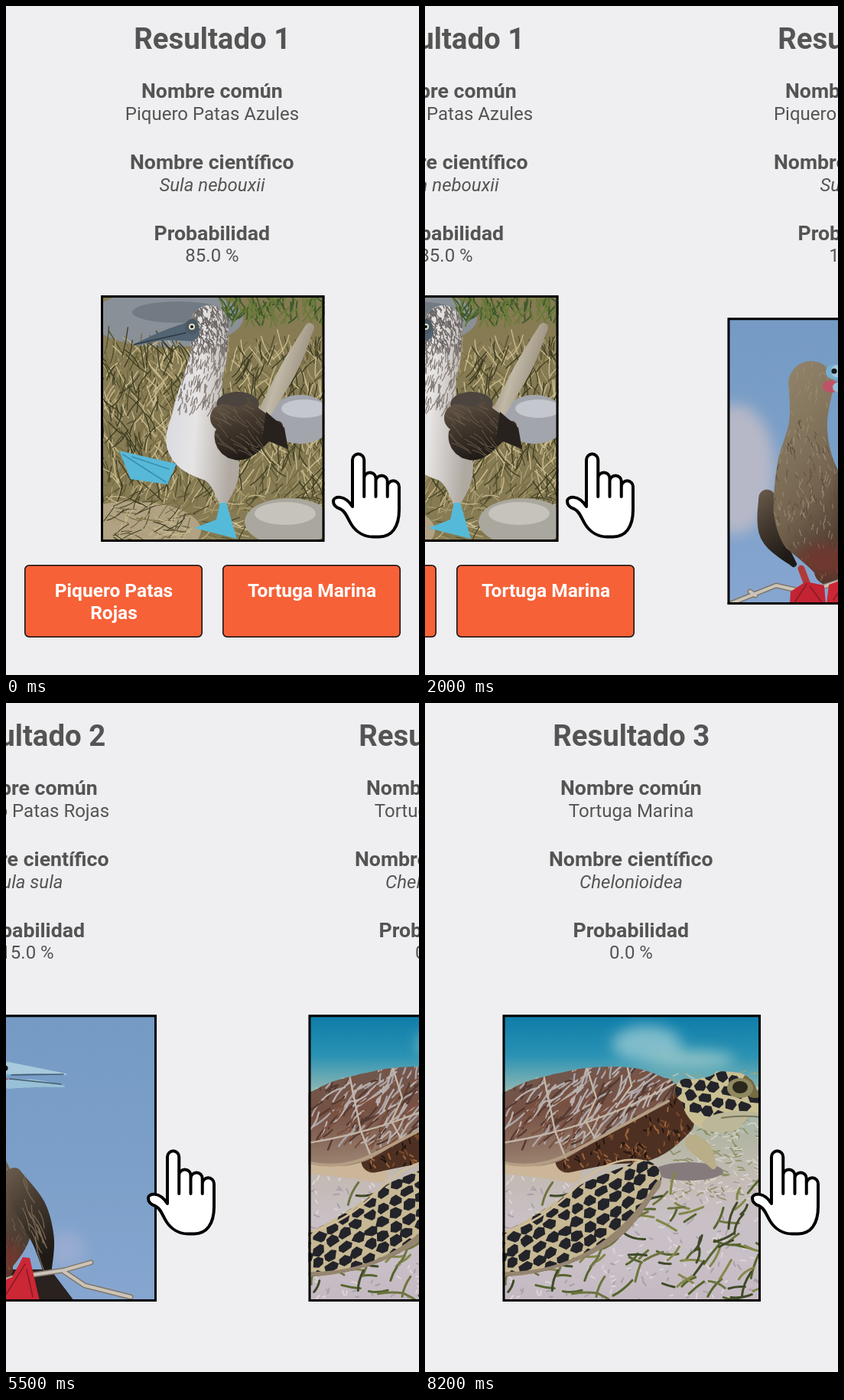
An HTML page for the animation above (9 s loop, 540x874 px).

```html
<!DOCTYPE html>
<html lang="es">
<head>
<meta charset="utf-8">
<title>Resultados</title>
<style>
html, body { margin: 0; width: 100%; height: 100%; overflow: hidden; background: #efeff1; }
#stage { display: block; width: 540px; height: 874px; }
text { font-family: Roboto, Arial, sans-serif; font-size: 24px; fill: #545454; text-anchor: middle; }
.title { font-size: 38.4px; font-weight: 700; }
.head { font-size: 26.7px; font-weight: 700; }
.sci { font-style: italic; }
.btn { font-size: 24.5px; font-weight: 700; fill: #fff; }
</style>
</head>
<body>
<svg id="stage" viewBox="0 0 540 874">
  <defs id="defs">
    <filter id="soft" x="-30%" y="-30%" width="160%" height="160%"><feGaussianBlur stdDeviation="9"/></filter>
  </defs>
  <g id="strip"></g>
</svg>
<script>
const PITCH = 536;
const LOOP = 9000;
const STEPS = [[0, 0], [2000, 242], [3500, 536], [5500, 778], [7000, 1072], [LOOP, 1072]];
const UP = -Math.PI / 2;

let seed = 11, ids = 0;
const rnd = () => {
  seed = (seed * 1664525 + 1013904223) % 4294967296;
  return seed / 4294967296;
};
const between = (a, b) => a + rnd() * (b - a);
const fix = v => v.toFixed(1);

const defs = document.getElementById('defs');
const define = markup => defs.insertAdjacentHTML('beforeend', markup);

// Evenly spaced gradient, returned as a paint
function fade(dx, dy, ...colors) {
  const id = `g${ids++}`;
  const stops = colors.map((c, i) => `<stop offset="${i / (colors.length - 1)}" stop-color="${c}"/>`).join('');
  define(`<linearGradient id="${id}" x2="${dx}" y2="${dy}">${stops}</linearGradient>`);
  return `url(#${id})`;
}

// Outline of a limb whose spine runs through "x,y,radius" points
function limb(points) {
  const p = points.split(' ').map(s => s.split(',').map(Number));
  const at = u => {
    const i = Math.min(Math.floor(u), p.length - 2), t = u - i;
    const b = p[i], c = p[i + 1], a = p[i - 1] || b, e = p[i + 2] || c;
    return b.map((v, k) => v + 0.5 * t * (c[k] - a[k] +
      t * (2 * a[k] - 5 * v + 4 * c[k] - e[k] + t * (3 * (v - c[k]) + e[k] - a[k]))));
  };
  const end = p.length - 1, left = [], right = [];
  for (let k = 0, n = end * 8; k <= n; k++) {
    const u = k / n * end, [x, y, r] = at(u);
    const [x0, y0] = at(Math.max(u - 0.02, 0)), [x1, y1] = at(Math.min(u + 0.02, end));
    const len = Math.hypot(x1 - x0, y1 - y0), nx = (y1 - y0) / len * r, ny = (x0 - x1) / len * r;
    left.push(`${fix(x + nx)},${fix(y + ny)}`);
    right.unshift(`${fix(x - nx)},${fix(y - ny)}`);
  }
  const cap = (r, to) => `A${r} ${r} 0 0 1 ${to}`;
  return `M${left.join('L')}${cap(p[end][2], right[0])}L${right.join('L')}${cap(p[0][2], left[0])}Z`;
}

const fill = (d, color, more = '') => `<path d="${d}" fill="${color}" ${more}/>`;
const line = (d, color, width, more = '') =>
  `<path d="${d}" fill="none" stroke="${color}" stroke-width="${width}" stroke-linecap="round" stroke-linejoin="round" ${more}/>`;
const poly = (points, color) => `<polygon points="${points}" fill="${color}"/>`;
const oval = (x, y, rx, ry, color, more = '') => `<ellipse cx="${x}" cy="${y}" rx="${rx}" ry="${ry}" fill="${color}" ${more}/>`;
const soft = art => `<g filter="url(#soft)">${art}</g>`;

// A filled shape with texture kept inside it
function skin(d, color, texture) {
  const id = `c${ids++}`;
  define(`<clipPath id="${id}"><path d="${d}"/></clipPath>`);
  return fill(d, color) + `<g clip-path="url(#${id})">${texture}</g>`;
}

// Random strokes inside a box
function blades(n, [x, y, w, h], len, angle, spread, color, width) {
  let d = '';
  for (let i = 0; i < n; i++) {
    const a = angle + between(-spread, spread), bend = a + between(-0.4, 0.4), l = len * between(0.25, 0.6);
    d += `M${fix(between(x, x + w))} ${fix(between(y, y + h))}` +
      `q${fix(Math.cos(bend) * l)} ${fix(Math.sin(bend) * l)} ${fix(Math.cos(a) * l * 2)} ${fix(Math.sin(a) * l * 2)}`;
  }
  return line(d, color, width);
}
const tufts = (n, box, len, angle, spread, width, colors) =>
  colors.map(c => blades(n, box, len, angle, spread, c, width)).join('');

// Staggered dark plates on a turned grid
function plates(x, y, cols, rows, w, h, deg) {
  let d = '';
  for (let r = 0; r < rows; r++) for (let c = 0; c < cols; c++) {
    const cx = (c + r % 2 / 2) * w + between(-2, 2), cy = r * h + between(-2, 2);
    for (let k = 0; k < 6; k++) {
      const a = (k + between(-0.3, 0.3)) * Math.PI / 3, s = between(0.42, 0.54);
      d += `${k ? 'L' : 'M'}${fix(cx + Math.cos(a) * w * s)} ${fix(cy + Math.sin(a) * h * s)}`;
    }
    d += 'Z';
  }
  return fill(d, '#23232a', `transform="translate(${x} ${y}) rotate(${deg})"`);
}

function blueFooted([x, y, w, h]) {
  const straw = ['#514e2c', '#ab9c70', '#776c44', '#c9bb8d', '#3f3e24'];
  const body = limb('266,416,25 265,455,24 257,490,26 252,530,34 258,568,48 282,612,24 284,650,5');
  const wing = limb('285,538,18 308,552,42 355,549,7');
  return `<rect x="${x}" y="${y}" width="${w}" height="${h}" fill="#867b53"/>` +
    oval(210, 408, 100, 38, '#8a9098') + oval(225, 400, 60, 14, '#727a84') +
    tufts(50, [285, 385, 130, 35], 24, UP, 0.9, 2, ['#3f5a2a', '#6a7a3a']) +
    tufts(190, [x, 450, w, 200], 32, UP, 0.9, 1.4, straw) +
    oval(385, 540, 42, 32, '#a2a5ac') + oval(390, 526, 30, 12, '#c4c7cd') +
    oval(165, 685, 90, 38, '#b0a283') +
    tufts(50, [x, 640, w, 60], 26, -0.4, 1, 1.1, straw) +
    oval(370, 674, 58, 31, '#aaa79e') + oval(365, 663, 40, 15, '#c5c3bb') +
    fill(limb('340,528,9 372,470,11 397,420,6'), fade(1, 0.5, '#75695a', '#c1b9a7', '#8d8272')) +
    skin(body, fade(1, 0.2, '#d5d8e0', '#e6e4e4', '#b0a9a2'),
      blades(260, [236, 390, 56, 60], 8, 1.3, 0.6, '#6b6664', 1.3) +
      blades(180, [226, 440, 65, 85], 11, 1.8, 0.3, '#857b75', 1.2)) +
    oval(303, 520, 28, 16, '#4c443e') +
    skin(wing, fade(0.4, 1, '#6b5d4d', '#43382e', '#1f1a16'),
      blades(50, [265, 515, 80, 70], 24, 0.7, 0.3, '#6a5c4c', 1)) +
    poly('340,530 364,551 369,579 335,565', '#28221e') +
    fill(limb('241,425,13 205,431,6 167,443,1'), '#526372') + line('M168 442L235 427', '#2d3943', 1.5) +
    oval(243, 419, 9, 10, '#4b5964') + oval(243, 419, 4, 4, '#e5e3c7') + oval(243, 419, 2, 2, '#111') +
    poly('148,581 223,598 211,625 163,618', '#58b8d8') + line('M153 586L209 622M165 589L213 605', '#398fae', 1.5) +
    poly('280,649 288,649 302,696 246,682 275,671', '#55bad9');
}

function redFooted([x, y, w, h]) {
  const body = limb('211,493,30 207,545,25 204,600,38 214,655,53 228,700,48 233,738,18');
  const dark = fade(0.4, 1, '#6b5d4d', '#43382e', '#1f1a16');
  const branch = 'M100 783L165 757L205 766L250 751L318 741L353 731M138 770L131 765M318 743L345 761L405 776';
  return `<rect x="${x}" y="${y}" width="${w}" height="${h}" fill="${fade(0, 1, '#759bc4', '#7b9fc8', '#86a6d0')}"/>` +
    soft(oval(112, 605, 52, 85, '#b6b8c7') + oval(320, 715, 25, 25, '#98abd0')) +
    poly('235,740 300,740 331,781 285,781', '#29221f') +
    fill(limb('153,642,11 159,690,15 188,729,4'), dark) +
    skin(body, fade(0.4, 1, '#94866f', '#86775f', '#74644f', '#4a372c'),
      blades(220, [160, 465, 110, 280], 8, 1.5, 0.6, '#9c8d76', 1) +
      blades(160, [160, 540, 115, 200], 8, 1.5, 0.6, '#5c4e3f', 1) +
      soft(oval(232, 725, 38, 22, '#70382f') + oval(262, 650, 14, 70, '#4d4034'))) +
    skin(limb('253,617,10 274,660,20 290,700,15 296,740,6'), dark,
      blades(24, [250, 610, 40, 110], 40, 1.15, 0.15, '#7a6a56', 1.2)) +
    oval(242, 478, 12, 10, '#77afcf') + oval(237, 497, 11, 8, '#bf5267') +
    fill(limb('245,477,8 280,480,4 320,485,1'), '#a8cadc') + fill(limb('245,498,6 280,497,5 318,501,1'), '#98c0d6') +
    line('M249 486L317 485M247 491L314 498', '#435b6c', 1.3) + oval(241, 477, 3.6, 3.6, '#15191c') +
    line(branch, '#81766b', 7) + line(branch, '#cbc4b8', 4) +
    line('M198 735L206 756', '#b03a38', 9) +
    poly('204,752 228,757 230,781 183,781 184,765', '#c32332') +
    poly('264,724 273,725 286,781 231,781 234,756 250,750', '#cc2735') +
    line('M205 755L190 778M209 758L224 778M267 733L240 776M269 740L277 776', '#841c27', 1.5);
}

function turtle([x, y, w, h]) {
  const weed = ['#56652f', '#83874a', '#6d7440', '#404a28'];
  const shell = limb('90,560,42 150,548,56 215,522,46 275,508,32 315,504,14');
  const neck = limb('185,598,16 235,580,24 290,565,32 330,530,33 352,520,20');
  const head = limb('342,506,16 372,520,38 412,520,36 430,523,18');
  const fin = limb('284,622,25 235,660,42 180,693,40 130,714,33 95,722,27');
  const sea = fade(0, 1, '#0d7ca9', '#2a92b3', '#9fbdb4', '#b3b6a4', '#c3bab4', '#c9c0c6', '#c9bfc7', '#c4b9c2');
  return `<rect x="${x}" y="${y}" width="${w}" height="${h}" fill="${sea}"/>` +
    soft(oval(290, 446, 45, 24, '#7fbccb') + oval(345, 466, 60, 12, '#8cc1c5')) +
    tufts(90, [x, 480, w, 90], 10, 0.1, 0.7, 1.4, ['#8fa58a', '#bcc4b2']) +
    tufts(90, [320, 550, 118, 100], 9, 0.2, 0.9, 1.6, ['#8a9063', '#d6d0c8']) +
    tufts(120, [x, 610, w, 170], 6, 0, 1.5, 2, ['#aaa0a8', '#dcd4d6']) +
    oval(345, 612, 45, 12, '#857b7c') +
    tufts(26, [x, 640, w, 140], 30, -0.4, 1, 3, weed) +
    fill(limb('90,600,14 150,606,14 195,616,11'), '#cbb699') +
    fill(limb('350,574,11 364,585,12 377,605,4'), '#b9ae88') +
    skin(neck, '#4e3022', tufts(110, [170, 495, 180, 125], 6, 1.2, 0.9, 2, ['#a0673c', '#24160f', '#7a4a2b'])) +
    skin(shell, fade(0.2, 1, '#6e5a52', '#765143', '#9a8270'),
      tufts(60, [x, 480, 220, 105], 30, -0.9, 0.45, 2.4, ['#a9a4a8', '#553a31', '#b8aeac', '#7b5140']) +
      line('M100 575Q220 556 326 497M155 486L170 559L186 600M211 475L224 516L210 546L224 572M265 477L270 500L250 528', '#c4b7a9', 2.4)) +
    line('M100 600Q145 611 186 590T318 520', '#b49e84', 4) +
    skin(head, '#c9bf93', plates(336, 478, 6, 4, 18, 16, 12) + oval(412, 552, 50, 19, '#bcb798') + oval(432, 498, 18, 18, '#756b43')) +
    line('M388 542Q414 538 438 541', '#77745b', 2) +
    oval(412, 503, 17, 13, '#8f8860') + oval(412, 502, 10, 8, '#2a281b') +
    skin(fin, '#c6b893', plates(82, 700, 15, 9, 20, 15, -33) +
      line('M95 750Q230 755 308 630', '#96866f', 14)) +
    line('M100 692Q150 680 195 635T284 598', '#d0bc99', 2.5);
}

// Four finger tops in a row, then palm and thumb
function hand() {
  const w = 15.25, tops = [593, 617, 621, 628], first = 453;
  let d = `M${first} 654V${tops[0]}`, folds = '';
  tops.forEach((top, i) => {
    const x = first + (i + 1) * w;
    d += `V${top}A${w / 2} ${w / 2} 0 0 1 ${x} ${top}`;
    if (i < 3) folds += `M${x} ${top}V641`;
  });
  d += 'V658C514 681 504 693.5 488 693.5H480C468 693.5 458 687 452 678C446 669 445 661 437 657' +
    'C431 655 428 651 428 647C428 640 443 638 453 654Z';
  return line(d + folds, '#000', 4).replace('fill="none"', 'fill="#fff"');
}

const label = (x, y, s, cls = '') => `<text x="${x}" y="${y}" class="${cls}">${s}</text>`;

function photo(box, draw) {
  const [x, y, w, h] = box;
  return `<svg x="${x}" y="${y}" width="${w}" height="${h}" viewBox="${box.join(' ')}">${draw(box)}</svg>` +
    `<rect x="${x + 1.5}" y="${y + 1.5}" width="${w - 3}" height="${h - 3}" fill="none" stroke="#000" stroke-width="3"/>`;
}

function button(x, ...rows) {
  return `<rect x="${x + 0.75}" y="730.75" width="231.5" height="93.5" rx="5.5" fill="#f66138" stroke="#111" stroke-width="1.5"/>` +
    rows.map((s, i) => label(x + 117, 772 + i * 29, s, 'btn')).join('');
}

function page(i, values, picture, extra = '') {
  const rows = ['Nombre común', 'Nombre científico', 'Probabilidad'].map((s, k) =>
    label(269.3, 119.5 + k * 93, s, 'head') + label(269.5, 149 + k * 92.6, values[k], k === 1 ? 'sci' : ''));
  return `<g transform="translate(${i * PITCH} 0)">` +
    label(269.8, 56, `Resultado ${i + 1}`, 'title') + rows.join('') + picture + extra + hand() + '</g>';
}

const NARROW = [124, 378, 292.5, 322], WIDE = [101.5, 407.3, 337.5, 374.7];
const strip = document.getElementById('strip');
strip.innerHTML =
  page(0, ['Piquero Patas Azules', 'Sula nebouxii', '85.0 %'], photo(NARROW, blueFooted),
    button(24, 'Piquero Patas', 'Rojas') + button(283, 'Tortuga Marina')) +
  page(1, ['Piquero Patas Rojas', 'Sula sula', '15.0 %'], photo(WIDE, redFooted)) +
  page(2, ['Tortuga Marina', 'Chelonioidea', '0.0 %'], photo(WIDE, turtle));

strip.animate(
  STEPS.map(([t, x]) => ({ offset: t / LOOP, transform: `translateX(${-x}px)`, easing: 'step-end' })),
  { duration: LOOP, iterations: Infinity }
);
</script>
</body>
</html>
```
